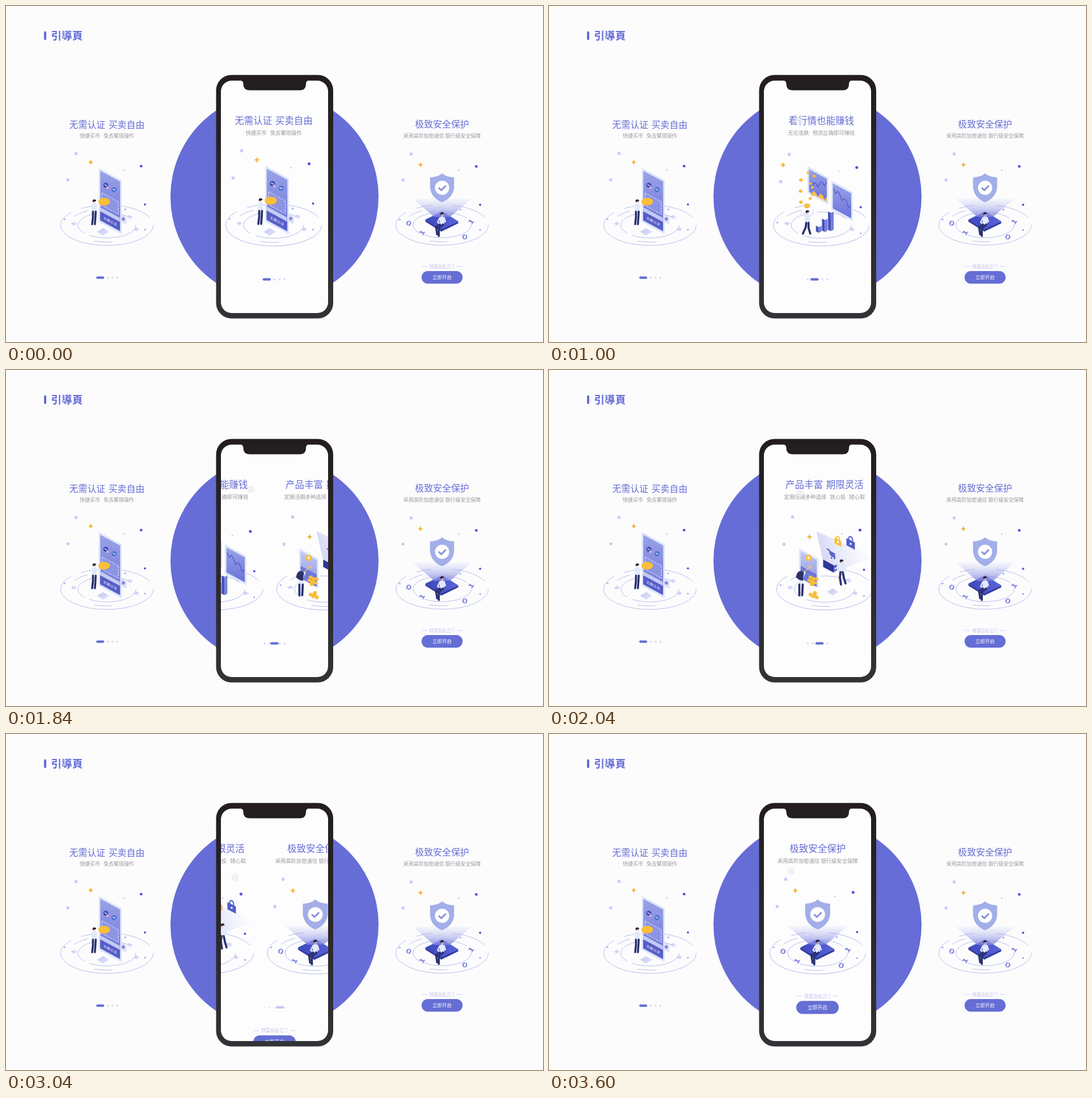
Animation, 947 px wide and 592 px high, one loop 3640 ms. Source, as an HTML page:

```html
<!DOCTYPE html>
<html lang="zh">
<head>
<meta charset="utf-8">
<title>引導頁</title>
<style>
html, body { margin: 0; width: 100%; height: 100%; overflow: hidden; background: #fcfcfd; }
svg { display: block; width: 947px; height: 592px; }
text { font-family: "Noto Sans CJK SC", "Noto Sans CJK", "Noto Sans", sans-serif; text-anchor: middle; }
.title { font-size: 16.5px; fill: #666dd4; word-spacing: 2px; }
.sub { font-size: 9.3px; fill: #98989d; }
.ring { fill: none; stroke: #a3a8e4; stroke-width: .8; }

/* --p is the page position, 0 to 3 */
.strip { transform: translateX(calc(var(--p) * -193.5px)); }
.pill { transform: translateX(calc(var(--p) * 8.9px)); }
.dots { opacity: calc(3 - var(--p)); }
.start { transform: translateY(calc((3 - var(--p)) * 164px)); }
</style>
</head>
<body>
<svg id="stage" viewBox="0 0 947 592"></svg>
<script>
const PALE = '#cfcaf6', GOLD = '#fac03c', AMBER = '#f0aa35', VIOLET = '#6746df',
      SKY = '#96b1ee', NAVY = '#29326f', HAIR = '#22233d', SHIRT = '#e3e8fa', SKIN = '#f5b9a5', INK = '#4650b8';
const SLOPE = .54;

const each = (n, f) => Array.from({ length: n }, (_, i) => f(i)).join('');
const dot = (x, y, r, c) => `<circle cx="${x}" cy="${y}" r="${r}" fill="${c}"/>`;
const oval = (x, y, rx, ry, c) => `<ellipse cx="${x}" cy="${y}" rx="${rx}" ry="${ry}" fill="${c}"/>`;
const fill = (d, c) => `<path d="${d}" fill="${c}"/>`;
const line = (d, c, w) =>
  `<path d="${d}" fill="none" stroke="${c}" stroke-width="${w}" stroke-linecap="round" stroke-linejoin="round"/>`;
const label = (cls, x, y, s) => `<text class="${cls}" x="${x}" y="${y}">${s}</text>`;
const gap = '&#160;'.repeat(3);

const grad = (id, a, b, to = 'x2="0" y2="1"', oa = 1, ob = 1) =>
  `<linearGradient id="${id}" x1="0" y1="0" ${to}>
    <stop stop-color="${a}" stop-opacity="${oa}"/><stop offset="1" stop-color="${b}" stop-opacity="${ob}"/>
  </linearGradient>`;

// Upright face whose top and bottom edges follow the isometric slope
const slab = (x, y, w, h, c, k = SLOPE) => fill(`M${x} ${y}l${w} ${w * k}v${h}l${-w} ${-w * k}z`, c);
const panel = (x, y, w, h, c = 'url(#panel)') =>
  slab(x, y, w, h, '#dfe7fb') + slab(x + 2.8, y + 5.5, w - 5.6, h - 8, c);
const tile = (x, y, r) => fill(`M${x - r} ${y}l${r} ${-r * .62}l${r} ${r * .62}l${-r} ${r * .62}z`, 'url(#tile)');
const star = (x, y) => fill(`M${x} ${y - 5.5}q.8 4.7 5 5.500q-4.200.8-5 5.500q-.8-4.700-5-5.500q4.200-.8 5-5.500`, '#f4b73f');
const coin = (x, y, rx, ry = rx * .75) => oval(x, y + 1, rx, ry, AMBER) + oval(x, y, rx, ry, GOLD);

// Coins packed on a sunflower spiral
const heap = (x, y, n, r) => each(n, i => {
  const d = Math.sqrt(i) * r * 1.05;
  return coin(x + d * Math.cos(i * 2.4), y + d * Math.sin(i * 2.4) * .8, r);
});

const wave = (x, y, w, rise) =>
  'M' + each(9, i => `${x + w * i / 8} ${y + rise * i / 8 + 5 * Math.sin(i * 2)} `);

const person = (x, y, arms, legs) => `<g transform="translate(${x} ${y})">` +
  line(arms, SHIRT, 2.5) + fill('M-4.500 5Q0 1 4.500 5L4 18H-4.500Z', SHIRT) + line(legs, NAVY, 3.7) +
  dot(0, 0, 2.4, SKIN) + fill('M-3.300 0q-.3-4.500 3.500-4.300q4 .5 2.800 3.500q-3-1-4.300 1.500z', HAIR) + '</g>';

const rings = () => [[84.5, '58 5 7 10 16 4'], [70, '0 22 10 24 8 36'], [53, '38 4 24 6 22 6']].map(([r, dash]) =>
  `<ellipse class="ring" cx="473.5" cy="386" rx="${r}" ry="${r * .437}" pathLength="100" stroke-dasharray="${dash}"/>`).join('');

const tiles = () => [185, -45, 25].map(deg => {
  const a = deg * Math.PI / 180;
  return tile(473 + 60 * Math.cos(a), 385 + 20 * Math.sin(a), 5.7);
}).join('');

const sparks = (dy, sx, sy) =>
  `<g transform="translate(0 ${dy})">` +
  dot(417, 255, 2.9, PALE) + dot(402, 303, 2.9, PALE) + dot(536, 278, 2.5, VIOLET) + dot(543, 348, 2, VIOLET) +
  dot(504, 285, 1.1, SKY) + dot(507, 357, 1.7, SKY) + dot(396, 375, 1.6, SKY) + dot(543, 394, 1.1, VIOLET) +
  '</g>' + star(sx, sy);

const scene = (title, sub, art) =>
  label('title', 473.5, 208.2, title) + label('sub', 473.5, 226.5, sub) + rings() + art;

const tablet = () => scene('无需认证 买卖自由', `快捷买币${gap}免去繁琐操作`,
  sparks(0, 444, 271) + tiles() + tile(466.5, 398, 11) +
  panel(458.5, 281, 42, 99) +
  dot(471.5, 313, 4.6, '#3d49b5') + dot(486.5, 321, 4.6, '#4a72d2') +
  line('M469.500 312l4 2M484.500 320l4 2', '#dfe5ff', 1.4) + dot(474.5, 317.5, 2.2, '#f0b5c4') +
  `<g stroke="#fff" stroke-dasharray="3 2">${slab(464.5, 327, 30, 23, '#8d95e2')}</g>` +
  slab(461, 353, 36, 7, '#c6cbf5') + slab(461, 361, 36, 15, '#555dc8') +
  slab(498, 365, 11, 14, '#dbe1fa') + dot(503.5, 374.5, 3, '#8b85dc') +
  `<text transform="translate(479.5 381) skewY(27)" font-size="6.2" fill="#fff">无需认证</text>` +
  coin(468.5, 342.5, 10.5, 6.6) +
  person(450.5, 343, 'M2 8L11 7', 'M-2.500 18L-2.500 28L-4 41M2.500 18L2 28L1 41'));

const charts = () => scene('看行情也能赚钱', `无论涨跌${gap}预测正确即可赚钱`,
  sparks(6.5, 406, 280) + tiles() +
  panel(449, 282, 37, 48) + panel(491, 307, 38, 52) +
  line(wave(453, 316, 30, -4), INK, 1.1) + line(wave(495, 322, 30, 32), INK, 1.1) +
  fill(wave(452, 326, 31, 12) + 'V345L452 328Z', GOLD) +
  each(9, i => coin(450 + 13 * Math.sin(i * 2.2), 293 + i * 6.5, 2.3 + i % 3 * .4)) + coin(448.5, 351.5, 5) +
  each(3, i => {
    const x = 464 + i * 10.7, h = 10 + i * 11, y = 400 - i * 1.5 - h;
    return slab(x, y - 3, 5, h, INK) + slab(x + 5, y - .3, 5, h, '#7580dc', -SLOPE);
  }) +
  person(449, 364, 'M-4 6L-10 3L-11 -4M4 6L10 2L10 -5', 'M-2 18L-3 26L-8 37M2 18L2 27L5 37'));

const lock = (x, y, w, c) =>
  line(`M${x + w * .28} ${y + 3}v-4q${w * .22}-${w * .3} ${w * .45} ${w * .2}v5`, c, 2) +
  slab(x, y, w, w * .85, c) + dot(x + w / 2, y + w * .68, 1.8, '#fff');

const vault = () => scene('产品丰富 期限灵活', `定期活期多种选择${gap}放心投${gap}随心取`,
  sparks(4, 447, 294) + tiles() + tile(488, 391, 10) +
  fill('M471 336L459 284L560 330L491 356Z', 'url(#side)') + slab(471, 334, 19, 13, '#2d3793') +
  slab(490, 345, 5, 11, '#5560ca', -SLOPE) +
  lock(491, 295, 12, GOLD) + lock(512, 296, 15, '#4f5fc9') +
  line('M478 315l4 3l3 9l7 3', '#3c48ad', 1.6) + slab(482, 318, 10, 6, '#5866cc') +
  dot(486, 331, 1.4, INK) + dot(491, 332, 1.4, INK) +
  panel(428.5, 314, 34, 52, 'url(#soft)') + slab(431.3, 345, 28.4, 22, '#6f79d8') +
  dot(445.5, 331, 5.5, GOLD) + dot(445.5, 331, 2.2, '#fff4d8') +
  line('M436 357L449 346M446 346l4-1l-1 4', '#f3bd72', 1.6) +
  heap(453, 371, 8, 3.2) + heap(456, 396, 5, 3.4) +
  person(432, 360, 'M2 7L7 -3', 'M-3 18L-3 37M3 18L2 37') +
  fill('M423 365Q425 354 432 354Q439 356 436 363L436 371Q428 371 423 365Z', '#2b3166') +
  person(503.5, 338, 'M-3 7L-11 12M4 7L8 15', 'M-2 18L-3 28L-1 40M2 18L4 28L7 38'));

const digit = (x, y, s, a) =>
  `<text transform="translate(${x} ${y}) rotate(${a}) scale(1.25 .85)" y="5" font-size="14" font-weight="700" fill="#7b82df">${s}</text>`;

const shield = () => scene('极致安全保护', '采用高阶加密通信 银行级安全保障',
  sparks(1, 434, 276) +
  digit(412.5, 383, 0, 25) + digit(437, 400, 1, -60) + digit(515, 408, 0, 15) + digit(526.5, 380, 1, -55) +
  fill('M443 376L472 393L503 379V383L472 398L443 380Z', '#343ea0') + fill('M443 376L474 361L503 379L472 394Z', 'url(#book)') +
  fill('M420 338H527L488 371H459Z', 'url(#beam)') +
  fill('M473.500 291.500Q481 298.500 495.500 299V317Q494 336 473.500 344.500Q453 336 451.500 317V299Q466 298.500 473.500 291.500Z', '#a3aee8') +
  dot(473.5, 318, 13, '#fff') + line('M468 318.500l4 4l7.500-7.500', '#8790da', 3) +
  person(473.5, 367, 'M-4 6L-8 14L-3 18M4 6L6 13L1 9', 'M-4 18L-11 23L-9 36M2 18L-6 25L-6 39'));

const start = () =>
  line('M436.500 461.700H446M500.500 461.700H510', '#c3c5ee', .8) +
  `<text x="473.5" y="464.5" font-size="7.7" fill="#bcbfea">财富自由之门</text>
   <rect x="436" y="470" width="75" height="23" rx="11.5" fill="#656ed5"/>
   <text x="473.5" y="484.9" font-size="8.8" fill="#fff">立即开启</text>`;

const dots = `<g class="dots">${each(5, i => dot(456 + i * 8.75, 481.7, 2, '#dcdcf7'))}
  <rect class="pill" x="452.5" y="479.5" width="14.5" height="4.3" rx="2.15" fill="#666dd5"/></g>`;
const glass = 'x="379" y="131.5" width="189" height="409.5" rx="19"';
const pages = [tablet, charts, vault, shield];

document.getElementById('stage').innerHTML = `
<defs>
  ${grad('panel', '#9aa3e6', '#6a72da')}
  ${grad('soft', '#c3c9f4', '#8c95e2')}
  ${grad('tile', '#c2c8f1', '#e3e5fa', 'x2="1" y2="1"')}
  ${grad('book', '#3e48bb', '#5964dc', 'x2="1" y2="0"')}
  ${grad('beam', '#c9cbf4', '#8087de', 'x2="0" y2="1"', .15, .85)}
  ${grad('side', '#b4b8f0', '#eeeffd', 'x2=".8" y2="-.2"', .5, .1)}
  ${grad('body', '#231d1e', '#323336')}
  <clipPath id="clip"><rect ${glass}/></clipPath>
  ${pages.map((f, i) => `<g id="page${i}">${f()}</g>`).join('')}
  <g id="go">${start()}</g>
</defs>
<rect width="947" height="592" fill="#fcfcfd"/>
<rect x="67" y="44.5" width="4" height="15.5" rx="2" fill="#656cd6"/>
<text x="107.3" y="59.2" font-size="18.7" font-weight="700" fill="#656cd6">引導頁</text>
<circle cx="473.5" cy="336" r="183.5" fill="#676dd6"/>
<g style="--p:0" transform="translate(-277.5 13.8) scale(.965)"><use href="#page0" x="-1.5"/>${dots}</g>
<g transform="translate(312.1 13.4) scale(.965)"><use href="#page3"/><use href="#go"/></g>
<rect x="370.5" y="121.5" width="206.5" height="429" rx="27" fill="url(#body)"/>
<rect ${glass} fill="#fdfdfe"/>
<g clip-path="url(#clip)">
  <g id="screen">
    <g class="strip">${pages.map((f, i) => `<use href="#page${i}" x="${i ? i * 193.5 : -1.5}"/>`).join('')}</g>
    ${dots}
    <g class="start"><use href="#go"/></g>
  </g>
</g>
<path d="M412 130H535Q529 132 529 137Q529 148.500 518 148.500H430Q418.500 148.500 418.500 137Q418.500 132 412 130Z" fill="#231f20"/>
<circle id="finger" r="6" fill="#eeeef1" fill-opacity=".75" stroke="#e2e2e7" stroke-width=".6"/>`;

const LOOP = 3640, RELEASE = [720, 1823, 3002];
const HOLD = .455;   // share of a page dragged before the finger lets go
const screen = document.getElementById('screen'), finger = document.getElementById('finger');

// Pulled along by the finger, then settling
const slide = u => u < 0 ? HOLD * Math.max(0, 1 + u / 220) ** 2 : 1 - (1 - HOLD) * Math.exp(-u / 102);

const track = (t, keys) => {
  const i = keys.findIndex(k => k[0] > t);
  if (i < 1) return keys[i ? keys.length - 1 : 0][1];
  const [a, x] = keys[i - 1], [b, y] = keys[i];
  return x + (y - x) * (t - a) / (b - a);
};
const reach = [[-600, 430], [-480, 518], [-225, 530], [-130, 630], [45, 396], [217, 443], [600, 427]];
const drop = [[0, 157], [600, 203], [1600, 202], [3040, 253], [LOOP, 241]];

function draw() {
  const t = performance.now() % LOOP;
  const page = RELEASE.reduce((sum, r) => sum + slide(t - r), 0);
  const next = RELEASE.findLast(r => t > r - 600) ?? RELEASE[0];
  screen.style.setProperty('--p', page);
  finger.setAttribute('transform', `translate(${track(t - next, reach)} ${track(t, drop)})`);
  finger.setAttribute('opacity', t < 40 ? 0 : 1);
  requestAnimationFrame(draw);
}
draw();
</script>
</body>
</html>
```
